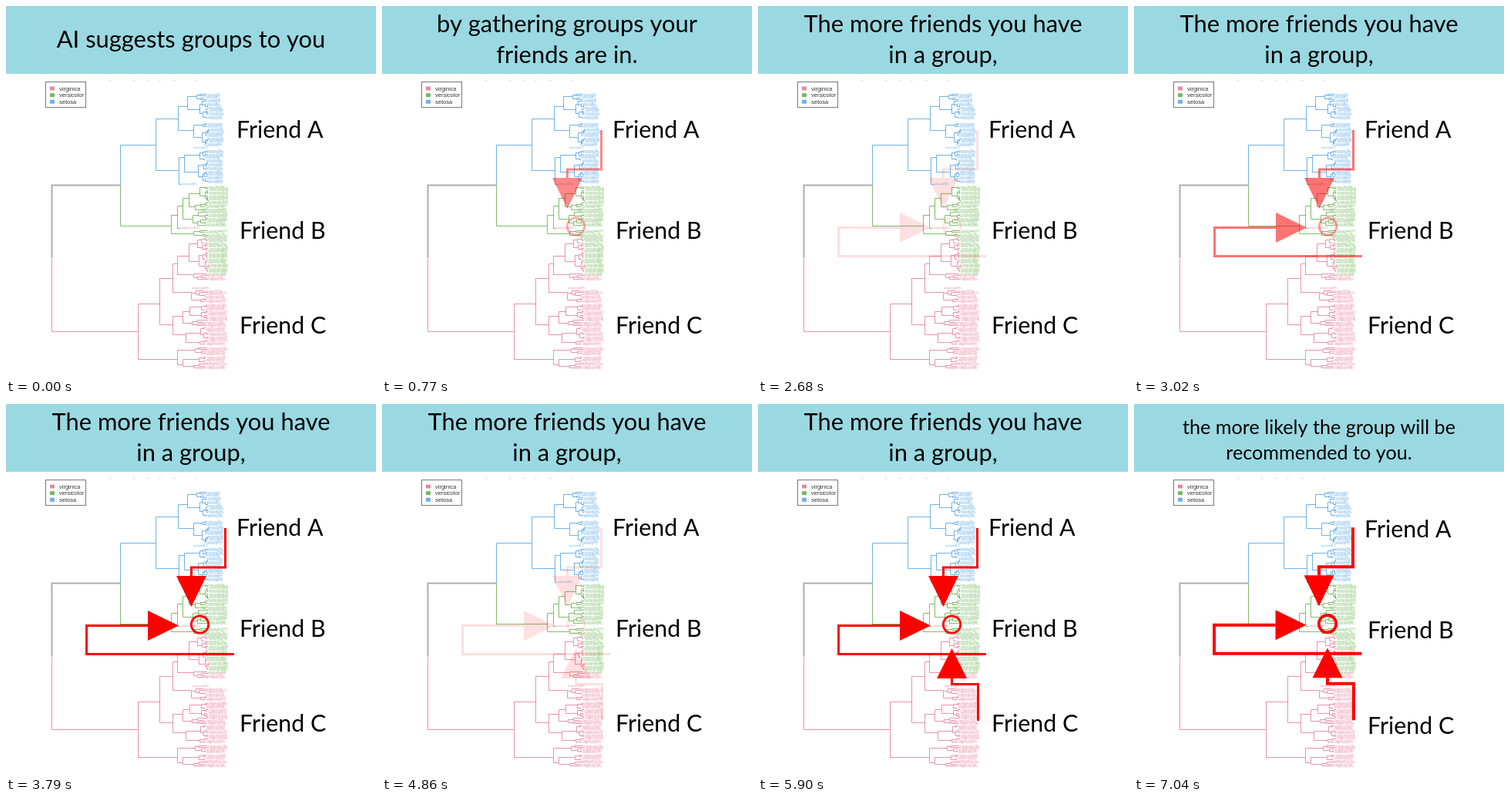
An HTML page with a canvas that plays this animation: 480 by 480 pixels, repeating every 8 s.

```html
<!DOCTYPE html>
<html lang="en">
<head>
<meta charset="utf-8">
<style>
html, body { margin: 0; width: 100%; height: 100%; overflow: hidden; background: #fff; }
canvas { display: block; }
</style>
</head>
<body>
<canvas id="stage" width="480" height="480"></canvas>
<script>
const BLUE = '#6fb2e6', GREEN = '#80bd6c', PINK = '#eb92aa', GREY = '#adadad', RED = '#ff0000';
const ctx = document.getElementById('stage').getContext('2d');

let seed = 11;
const rand = () => (seed = seed * 16807 % 2147483647) / 2147483647;

function line(c, color, width, ...pts) {
  c.strokeStyle = color;
  c.lineWidth = width;
  c.beginPath();
  for (let i = 0; i < pts.length; i += 2) c.lineTo(pts[i], pts[i + 1]);
  c.stroke();
}

function write(c, text, x, y, size, font, color = '#000', align = 'left') {
  c.font = `${size}px ${font}`;
  c.fillStyle = color;
  c.textAlign = align;
  c.fillText(text, x, y);
}

const SANS = '"Liberation Sans", Arial, sans-serif';
const LATO = 'Lato, Carlito, sans-serif';

// The dendrogram never changes, so it is drawn once.
function makeChart() {
  const layer = document.createElement('canvas');
  layer.width = layer.height = 480;
  const c = layer.getContext('2d');
  const px = v => Math.floor(v) + 0.5;
  const branch = (color, ...pts) => line(c, color, 1, ...pts.map(px));
  let count = 0;

  function leaf(x, y) {
    const [name, color] = y < 232 ? ['setosa', BLUE] : y < 349 ? ['versicolor', GREEN] : ['virginica', PINK];
    write(c, `${name}(${++count})`, x, y + 1.4, 4, SANS, color);
  }

  // A subtree entered from x0, splitting at x, whose leaves fill top to bottom.
  function cluster(color, x0, x, top, bottom, y = (top + bottom) / 2) {
    const n = Math.round((bottom - top) / 2.38);
    if (n < 2) {
      const tip = 257 + rand() * 6;
      if (tip > x0) branch(color, x0, y, tip, y);
      leaf(Math.max(tip, x0) + 1, y);
      return;
    }
    const cut = top + (bottom - top) * Math.max(1, Math.min(n - 1, Math.round(n * (0.25 + rand() * 0.5)))) / n;
    const next = () => x + (263 - x) * (0.25 + rand() * 0.4);
    branch(color, x0, y, x, y);
    branch(color, x, (top + cut) / 2, x, (cut + bottom) / 2);
    cluster(color, x, next(), top, cut);
    cluster(color, x, next(), cut, bottom);
  }

  // Main splits
  line(c, GREY, 2, 59.5, 327, 59.5, 232.5, 148, 232.5);
  branch(PINK, 59, 327, 59, 422, 171, 422);
  branch(BLUE, 148, 232, 148, 180, 194, 180);
  branch(GREEN, 148, 232, 148, 285, 214, 285);

  // Blue
  branch(BLUE, 223, 146, 194, 146, 194, 213, 224, 213);
  branch(BLUE, 223, 130, 223, 161);
  cluster(BLUE, 223, 235, 113, 147);
  cluster(BLUE, 223, 243, 151, 182, 161);
  branch(BLUE, 224, 196, 224, 231, 227, 231);
  cluster(BLUE, 224, 231, 186, 230, 196);
  leaf(228, 231);
  leaf(243, 184);

  // Green
  branch(GREEN, 222, 271, 214, 271, 214, 295, 243, 295);
  branch(GREEN, 222, 259, 222, 288, 226, 288);
  cluster(GREEN, 222, 229, 233, 286);
  write(c, 'virginica(107)', 227, 289.4, 4, SANS, PINK);
  cluster(GREEN, 214, 243, 290, 300);

  // Pink
  branch(PINK, 199, 386, 171, 386);
  branch(PINK, 171, 386, 171, 458, 222, 458);
  branch(PINK, 216, 353, 199, 353, 199, 413, 216, 413);
  branch(PINK, 222, 334, 216, 334, 216, 371, 240, 371);
  branch(PINK, 222, 324, 222, 348, 243, 348);
  cluster(PINK, 222, 237, 299, 346, 324);
  cluster(PINK, 222, 243, 346, 356, 348);
  leaf(241, 366);
  cluster(PINK, 216, 240, 368, 385, 371);
  branch(PINK, 216, 402, 216, 426);
  cluster(PINK, 216, 229, 386, 416, 402);
  cluster(PINK, 216, 233, 416, 440, 426);
  branch(PINK, 222, 446, 222, 465);
  cluster(PINK, 222, 245, 442, 453, 446);
  cluster(PINK, 222, 229, 454, 471, 465);

  // Legend
  c.strokeStyle = '#777';
  c.strokeRect(51.5, 98.5, 52, 33);
  [['virginica', '#e58aa6'], ['versicolor', '#76b863'], ['setosa', '#6cb0e2']].forEach(([name, color], i) => {
    const y = 107 + i * 8.6;
    c.fillStyle = color;
    c.fillRect(57, y - 2.5, 6, 5);
    write(c, name, 69, y + 2.8, 7.5, SANS, '#333');
  });

  // Cropped heading remains
  c.fillStyle = '#ddd';
  for (const x of [133, 164, 182, 198, 217, 245]) c.fillRect(x, 96, 3, 1);
  return layer;
}

// Shaft points, then the head as base, base, tip
const arrows = [
  [[284.5, 161, 284.5, 212, 240.5, 212, 240.5, 223], [221, 223, 260, 223, 240.5, 263]],
  [[296, 324.5, 104.5, 324.5, 104.5, 287.5, 184, 287.5], [184, 268, 184, 307, 224, 287.5]],
  [[285.5, 411, 285.5, 363.5, 251.5, 363.5, 251.5, 356], [232, 356, 271, 356, 251.5, 317]]
];

function drawArrow([shaft, head], width) {
  line(ctx, RED, width, ...shaft);
  ctx.fillStyle = RED;
  ctx.beginPath();
  for (let i = 0; i < 6; i += 2) ctx.lineTo(head[i], head[i + 1]);
  ctx.fill();
}

const MORE = ['The more friends you have', 'in a group,'];
const titles = [
  ['AI suggests groups to you'],
  ['by gathering groups your', 'friends are in.'],
  MORE, MORE,
  ['the more likely the group will be', 'recommended to you.']
];
const starts = [0, 500, 2680, 4860, 7040];
const chart = makeChart();

function draw(t) {
  const scene = starts.filter(s => t >= s).length - 1;
  const last = scene === 4;
  ctx.fillStyle = '#fff';
  ctx.fillRect(0, 0, 480, 480);
  ctx.fillStyle = '#9ad9e2';
  ctx.fillRect(0, 0, 480, 88);
  ctx.drawImage(chart, 0, 0);

  const lines = titles[scene];
  const size = last ? 25.2 : 30.9;
  const [base, pitch] = last ? [39, 33] : lines.length > 1 ? [33.5, 40] : [54, 0];
  lines.forEach((s, i) => write(ctx, s, 240, base + i * pitch, size, LATO, '#000', 'center'));

  [[300, 171, 173], [304, 302, 304], [304, 425, 428]].forEach(([x, y, y2], i) =>
    write(ctx, 'Friend ' + 'ABC'[i], x - 1, last ? y2 : y, 30.4, LATO));

  if (!scene) return;
  // The marks fade in by steps; the ring takes longer than the arrows.
  const step = last ? 99 : Math.floor((t - starts[scene]) / 67);
  const fade = n => Math.min(1, (step + 1.5) / n);
  const width = last ? 4 : 3;
  ctx.save();
  if (last) ctx.translate(-0.5, -0.8);
  ctx.globalAlpha = fade(11.8);
  arrows.slice(0, Math.min(scene, 3)).forEach(a => drawArrow(a, width));
  ctx.globalAlpha = fade(17);
  ctx.strokeStyle = RED;
  ctx.lineWidth = width - 0.2;
  ctx.beginPath();
  ctx.arc(251.5, 286, 11.2, 0, 7);
  ctx.stroke();
  ctx.restore();
}

const begin = performance.now();
function tick() {
  draw((performance.now() - begin) % 8000);
  requestAnimationFrame(tick);
}
tick();
</script>
</body>
</html>
```
